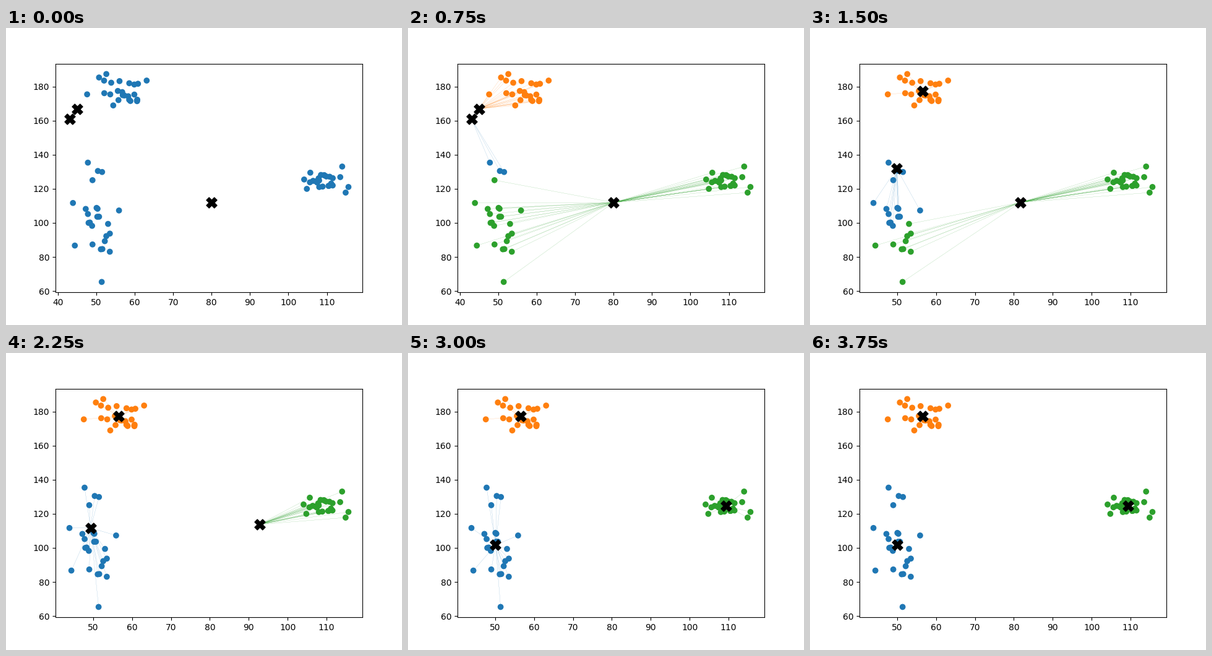
Write a matplotlib script that moves like this. It is 640 px wide and 480 px high and loops after 4.5 s.

```python
import matplotlib.pyplot as plt
import numpy as np
from matplotlib.animation import FuncAnimation

CLOUD_SIZE = 25
START = np.array([(43, 161), (45, 167), (80, 112)], float)
COLORS = np.array(["tab:blue", "tab:orange", "tab:green"])
rng = np.random.default_rng(5)


def cloud(mean, reach, outer):
    """Fill the space inside a few outer points so that the whole cloud has the given mean."""
    outer = np.array(outer)
    count = CLOUD_SIZE - len(outer)
    inner = rng.uniform(-1, 1, (count, 2)) * reach
    inner += (CLOUD_SIZE * np.array(mean) - outer.sum(axis=0)) / count - inner.mean(axis=0)
    return np.vstack([outer, inner])


POINTS = np.vstack([
    cloud((56.6, 177.3), (5.2, 6),
          [(52.6, 187.43), (50.7, 185.4), (47.6, 175.5), (54.4, 169),
           (60.6, 171.5), (63.1, 183.6)]),
    cloud((50.1, 101.7), (4, 17),
          [(47.8, 135.4), (50.4, 130.5), (51.5, 129.9), (49, 125.1),
           (43.91, 111.7), (55.9, 107.3), (44.4, 86.7), (51.4, 65.33)]),
    cloud((109.4, 124.7), (3, 4),
          [(104.1, 125.5), (104.8, 120), (105.7, 129.5), (114, 133.1),
           (113.5, 126.9), (115.63, 121.1), (114.9, 117.8)]),
])


def k_means(centers):
    """Yield (centers, labels) for every step until the centers settle."""
    while True:
        gaps = POINTS[:, None] - centers
        labels = (gaps ** 2).sum(axis=2).argmin(axis=1)
        yield centers, labels
        moved = np.array([POINTS[labels == k].mean(axis=0) for k in range(len(centers))])
        if np.allclose(moved, centers):
            return
        centers = moved


steps = list(k_means(START))
# (centers, labels, whether to draw the links)
states = [(START, np.zeros(len(POINTS), int), False)]
states += [(centers, labels, True) for centers, labels in steps]
states.append((*steps[-1], False))

fig, ax = plt.subplots(figsize=(6.4, 4.8), dpi=100)


def draw(i):
    centers, labels, linked = states[i]
    ax.clear()
    if linked:
        for point, k in zip(POINTS, labels):
            ax.plot(*zip(centers[k], point), color=COLORS[k], lw=0.1, zorder=0.5)
    ax.scatter(*POINTS.T, c=COLORS[labels])
    ax.scatter(*centers.T, c="black", marker="X", s=150)


anim = FuncAnimation(fig, draw, frames=len(states), init_func=lambda: None,
                     interval=750, repeat=True, repeat_delay=0)
plt.show()
```
